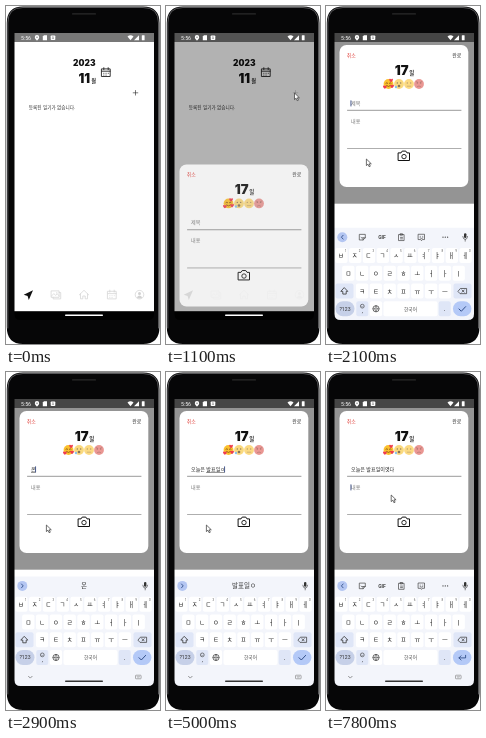
Write an HTML page that moves like this. It is 154x338 px and loops after 8000 ms.

```html
<!DOCTYPE html>
<html lang="ko">
<head>
<meta charset="utf-8">
<title>Diary app</title>
<style>
html, body { margin: 0; width: 100%; height: 100%; overflow: hidden; background: #fff; }
svg { display: block; width: 100%; height: 100%; }
text { font-family: "Noto Sans CJK KR", "Noto Sans CJK", "Noto Sans", sans-serif; white-space: pre; }
.num { font-family: Inter, sans-serif; font-weight: 900; }
.ui { font-family: Roboto, sans-serif; }
</style>
</head>
<body>
<svg id="stage" viewBox="0 0 154 338"></svg>
<script>
const LOOP = 8000;
const stage = document.getElementById('stage');

// Markup helpers
const text = (x, y, s, size, attrs = '') => `<text x="${x}" y="${y}" font-size="${size}" ${attrs}>${s}</text>`;
const mid = (x, y, s, size, attrs = '') => text(x, y, s, size, 'text-anchor="middle" ' + attrs);
const box = (x, y, w, h, r, fill, attrs = '') =>
  `<rect x="${x}" y="${y}" width="${w}" height="${h}" rx="${r}" fill="${fill}" ${attrs}/>`;
const dot = (x, y, r, fill, attrs = '') => `<circle cx="${x}" cy="${y}" r="${r}" fill="${fill}" ${attrs}/>`;
const line = (d, color, w, attrs = '') =>
  `<path d="${d}" fill="none" stroke="${color}" stroke-width="${w}" stroke-linecap="round" stroke-linejoin="round" ${attrs}/>`;
const fill = (d, color, attrs = '') => `<path d="${d}" fill="${color}" ${attrs}/>`;
const at = (x, y, body, attrs = '') => `<g transform="translate(${x} ${y})" ${attrs}>${body}</g>`;

function statusIcons() {
  return text(15, 33.6, '5:56', 5.2, 'class="ui" fill="#fff"') +
    fill('M31 29.1a2.2 2.2 0 0 1 2.2 2.2c0 1.5-2.2 3.4-2.2 3.4s-2.2-1.9-2.2-3.4a2.2 2.2 0 0 1 2.2-2.2z', '#fff') +
    dot(31, 31.3, .7, '#777') +
    fill('M38 29.3h3v5h-4.2v-3.8z', '#fff') +
    box(44.7, 29.5, 4.6, 4.6, .8, '#fff') + mid(47, 33.2, 'A', 3.6, 'class="ui" fill="#777"') +
    fill('M121.5 30.4q3-2.3 6 0l-3 3.8z', '#fff') +
    fill('M133 29.3v5h-5z', '#fff') +
    box(135.8, 29.3, 2.8, 5, .5, '#fff');
}

function calendar(x, y, color, w) {
  return at(x, y, line('M-4.2-3.4h8.4v7.6h-8.4zM-4.2-1.1h8.4M-2.2-4.6v2M2.2-4.6v2', color, w) +
    line('M-2.2 1h.1M0 1h.1M2.2 1h.1M-2.2 2.8h.1M0 2.8h.1', color, w));
}

function tabs() {
  const c = '#d2d2d2', w = .7, y = 288.7;
  return fill('M27 284.2l-9.3 4.5 3.9 1.3 1.2 3.9z', '#111') +
    at(50, y, line('M-4.5-3.8h7.6v6.4h-7.6zM3.1-2.2h1.6v6.4h-7.6v-1.6M-4.5 1.2l2.4-2.2 1.8 1.6 1.5-1.3 1.9 1.7', c, w) + dot(.8, -1.8, .6, c)) +
    at(78, y, line('M-4.7.2L0-4.4 4.7.2M-3.5-.8v4.9h2.3v-2.8h2.4v2.8h2.3v-4.9', c, w)) +
    calendar(106, y, c, w) +
    at(133.5, y, dot(0, 0, 4.3, 'none', `stroke="${c}" stroke-width="${w}"`) + dot(0, -1.2, 1.5, c) + fill('M-2.8 2.7q2.8-3.6 5.6 0Q0 5-2.8 2.7z', c));
}

function home() {
  return box(8, 27, 141, 290, 0, '#fff') + box(8, 27, 141, 9, 0, '#777') +
    mid(78.3, 59.6, '2023', 8.4, 'class="num" fill="#111"') +
    mid(78.3, 77.2, '11', 12.8, 'class="num" fill="#111"') +
    text(85.2, 77, '월', 5.2, 'font-weight="700" fill="#222"') +
    calendar(100, 66.3, '#222', .9) +
    line('M127.2 86.8h4.6M129.5 84.5v4.6', '#222', .6, 'id="plus"') +
    text(22.8, 103.3, '등록된 일기가 없습니다.', 4.65, 'fill="#333"') +
    tabs();
}

function face(x, color, opacity, parts) {
  return at(x, 132, dot(0, 0, 4.9, color) + parts, `opacity="${opacity}"`);
}

function moods() {
  const eyes = c => dot(-1.7, -1, .65, c) + dot(1.7, -1, .65, c);
  const heart = (x, y) => at(x, y, fill('M0 2.2C-3.4 0-1.3-2.2 0-.6 1.3-2.2 3.4 0 0 2.2z', '#ef3b4f'));
  return face(62.5, '#fbc02d', 1, line('M-2.6-.8q.9-1 1.8 0M.8-.8q.9-1 1.8 0M-1.9 1.6q1.9 1.9 3.8 0', '#6b3a10', .7) +
      heart(-3.6, 2.6) + heart(3.6, 1.8) + heart(2.6, -4)) +
    face(73, '#f7c948', .7, eyes('#5b3a10') + dot(0, 2, 1.3, '#5b3a10') + dot(-3, 3, 1.2, '#5aa9e6')) +
    face(83, '#fbc740', .65, eyes('#8a6420') + line('M-1.8 2.2h3.6', '#8a6420', .6)) +
    face(93, '#e0605a', .65, eyes('#7a2a20') + line('M-2.8-2.4l1.6.7M2.8-2.4l-1.6.7M-1.7 2.6q1.7-1.5 3.4 0', '#7a2a20', .6));
}

function dialog() {
  return box(13.5, 93, 128.8, 142, 7, '#fff') +
    text(20.8, 104.8, '취소', 4.9, 'fill="#e0443e"') +
    text(126.2, 104.8, '완료', 4.9, 'fill="#333"') +
    mid(75.6, 122.9, '17', 13.2, 'class="num" fill="#111"') +
    text(83.3, 122.5, '일', 5.4, 'font-weight="700" fill="#222"') +
    moods() +
    text(25, 153, '', 5.05, 'id="title"') + box(25, 154.1, 0, .5, 0, '#333', 'id="compose"') +
    line('M21.5 158.3H135', '#555', .6) +
    text(25, 171, '내용', 5.05, 'fill="#777"') +
    line('M21.5 196.5H135', '#777', .6) +
    box(24.5, 148.4, .9, 6, 0, '#34477f', 'id="caret"') +
    at(78, 204, line('M-5.5-3.1H-3l1.2-1.8h3.6L3-3.1h2.5v7.6h-11z', '#111', 1) + dot(0, .6, 2.2, 'none', 'stroke="#111" stroke-width=".9"'));
}

const KEY_H = 15, PITCH = 13.8;
const keyCap = (x, y, w, color = '#fff', r = 2) => box(x - w / 2, y - KEY_H / 2, w, KEY_H, r, color);

function keyRow(chars, x, y, digits) {
  return [...chars].map((c, i) => {
    const cx = x + i * PITCH;
    return keyCap(cx, y, 12.3) + mid(cx - (digits ? .5 : 0), y + 2.5, c, 6.3, 'fill="#222"') +
      (digits ? mid(cx + 4.3, y - 3.2, (i + 1) % 10, 3, 'class="ui" fill="#555"') : '');
  }).join('');
}

function toolbar() {
  const c = '#444', w = .7;
  return line('M.8-1.9L-.9 0 .8 1.9', '#23407c', .8) +
    at(20.2, 0, line('M-2.8-2.8h5.6v3.4L.6 2.8h-3.4zM2.8.6H.6v2.2M-1.5.3q.8 1 1.9.5', c, w)) +
    mid(39.7, 1.9, 'GIF', 5, `class="ui" font-weight="700" fill="${c}"`) +
    at(59.2, 0, line('M-2.6-2.6h5.2v6h-5.2zM-1-3.4h2v1.4h-2zM-1 .2h2M-1 1.7h2', c, w)) +
    at(79.2, 0, line('M-3-2.9h6v5.3H.8L0 3.5-.8 2.4H-3zM-1.3-.8h.1M1.2-.8h.1M-1.4.8q1.4 1.1 2.8 0', c, w)) +
    [-2.3, 0, 2.3].map(d => dot(103 + d, 0, .65, c)).join('');
}

function topStrip() {
  return at(16.3, 213.9, dot(0, 0, 5, '#b4c6f2') + `<g id="tools">${toolbar()}</g>` +
    '<g id="suggest">' + line('M-.8-1.9L.9 0l-1.7 1.9', '#23407c', .8) +
    mid(61.7, 2.1, '', 6.5, 'id="word" fill="#333"') + '</g>' +
    at(122.9, 0, box(-1.2, -4, 2.4, 4.8, 1.2, '#333') + line('M-2.4-.7q.3 2.9 2.4 2.9t2.4-2.9M0 2.3V4', '#333', .6)));
}

function keyboard() {
  const dark = '#333', tint = '#dfe6f7', blue = '#b4c9f7', y3 = 267.8, y4 = 285.5;
  return box(8, 204.5, 141, 130, 0, '#f3f5fb') + topStrip() +
    keyRow('ㅂㅈㄷㄱㅅㅛㅕㅑㅐㅔ', 15.4, 232.2, true) +
    keyRow('ㅁㄴㅇㄹㅎㅗㅓㅏㅣ', 22.3, 250, false) +
    keyRow('ㅋㅌㅊㅍㅠㅜㅡ', 36.1, y3, false) +
    keyCap(18.5, y3, 18, tint) + line(`M18.5 ${y3 - 3.2}l3.3 3.5h-1.6v2.7h-3.4v-2.7h-1.6z`, dark, .8) +
    keyCap(136.5, y3, 18, tint) + line(`M132.2 ${y3}l2.2-2.6h6.2v5.2h-6.2zM136 ${y3 - 1.1}l2.2 2.2M138.2 ${y3 - 1.1}l-2.2 2.2`, dark, .7) +
    keyCap(19, y4, 19, '#c6d0e8', 7.5) + mid(19, y4 + 1.9, '?123', 5.2, `class="ui" fill="${dark}"`) +
    keyCap(36.3, y4, 12, tint) + dot(36.3, y4 - 2.6, 1.9, 'none', `stroke="${dark}" stroke-width=".6"`) +
    line(`M35.5 ${y4 - 2.2}q.8 .8 1.6 0`, dark, .4) + mid(36.3, y4 + 4.2, ',', 6, `class="ui" fill="${dark}"`) +
    keyCap(50, y4, 12.3) + at(50, y4, dot(0, 0, 3.1, 'none', `stroke="${dark}" stroke-width=".7"`) +
      line('M-3 0h6M0-3q-2.8 3 0 6 2.8-3 0-6', dark, .5)) +
    keyCap(84.5, y4, 54) + mid(84.5, y4 + 1.8, '한국어', 4.8, 'fill="#555"') +
    keyCap(118.7, y4, 12, tint) + mid(118.7, y4 + 2, '.', 7, `class="ui" fill="${dark}"`) +
    keyCap(136.2, y4, 18.5, blue, 7.5) +
    line(`M133 ${y4 + .2}l2.3 2.3 4.3-4.6`, '#23407c', .9, 'id="done"') +
    line(`M139.6 ${y4 - 2.2}v2.6h-6.6M135 ${y4 - 1.7}l-2 2.1 2 2.1`, '#23407c', .8, 'id="enter"') +
    line('M22.5 304.3l1.8 1.8 1.8-1.8', '#666', .7) +
    box(129.5, 303.2, 5.6, 3.6, .6, 'none', 'stroke="#777" stroke-width=".6"') + line('M131 304.5h2.6M131.5 305.7h1.6', '#777', .4);
}

function phone() {
  const frame = 'M17 .5H137Q153.5 .5 153.5 17V321Q153.5 338 137 338H17Q.8 338 .8 321V17Q.8 .5 17 .5z';
  const hole = 'M8.5 27V308Q8.5 314 14.5 314H142Q148 314 148 308V27z';
  return fill(frame + hole, '#060607', 'fill-rule="evenodd"') +
    line('M1.8 322V17Q1.8 1.5 17 1.5H137Q152.5 1.5 152.5 17V322', '#58585a', 1) +
    box(66, 7.3, 24, 1.2, .6, '#2a2a2b');
}

stage.innerHTML =
  '<defs><clipPath id="screen"><rect x="8" y="27" width="141" height="288"/></clipPath></defs>' +
  '<g clip-path="url(#screen)">' + home() +
  box(8, 27, 141, 279, 0, '#000', 'id="dim"') + statusIcons() +
  box(8, 197.7, 141, 120, 0, '#fff', 'id="gap"') +
  `<g id="dialog">${dialog()}</g>` +
  box(8, 305.2, 141, 12, 0, '#000', 'id="nav"') +
  `<g id="keys">${keyboard()}</g>` +
  box(59, 308.4, 38, 1.5, .7, '#fff', 'id="handle"') + '</g>' + phone() +
  '<g id="cursor">' + fill('M0 0v6.6l1.6-1.4 1.1 2.5 1.2-.5-1.1-2.4h2.1z', '#fff', 'stroke="#333" stroke-width=".7" stroke-linejoin="round"') + '</g>';

const el = {};
stage.querySelectorAll('[id]').forEach(n => el[n.id] = n);
const set = (n, k, v) => el[n].setAttribute(k, v);
const show = (n, on) => set(n, 'display', on ? 'inline' : 'none');

// Typing: time, committed text, syllables being composed
const FIRST = '오늘은 ';
const typing = [
  ...['ㅇ', '오', '온', '오느', '오늘', '오늘ㅇ', '오늘으', '오늘은'].map((s, i) => [2700 + i * 100, '', s]),
  [3600, FIRST, ''], [3880, FIRST, 'ㅂ'], [4000, FIRST, '바'], [4100, FIRST, '발'],
  [4300, FIRST, '발ㅍ'], [4400, FIRST, '발표'], [4500, FIRST, '발푱'], [4600, FIRST, '발표이'],
  [4700, FIRST, '발표일'], [5000, FIRST, '발표일ㅇ'], [5600, FIRST, '발표일이'], [5700, FIRST, '발표일잉'],
  [5800, FIRST, '발표일이여'], [5900, FIRST, '발표일이엿'], [6200, FIRST, '발표일이엿ㄷ'], [6300, FIRST, '발표일이엿다']
];
const path = [[200, 146, 92], [600, 128.5, 87], [1200, 128.5, 87], [1600, 40.4, 153],
  [6950, 40.4, 153], [7100, 48, 147], [7250, 48, 147], [7500, 65.2, 123]];
const caretOff = [[2450, 2700], [6700, 7100], [7500, 7780]];

const clamp = v => Math.max(0, Math.min(1, v));
const width = s => [...s].reduce((w, c) => w + (c === ' ' ? .224 : .92), 0) * 5.05;

function cursorAt(t) {
  const i = path.findIndex(p => p[0] > t);
  if (i < 0) return path[path.length - 1].slice(1);
  if (i === 0) return path[0].slice(1);
  const [a, b] = [path[i - 1], path[i]], u = (t - a[0]) / (b[0] - a[0]);
  return [a[1] + (b[1] - a[1]) * u, a[2] + (b[2] - a[2]) * u];
}

function draw(t) {
  const opened = clamp((t - 900) / 265);
  const raised = t >= 1990;
  const moved = t >= 7780;
  const [, done, part] = typing.filter(k => k[0] <= t).pop() || [0, '', ''];
  const typed = done + part;

  set('plus', 'opacity', t >= 780 && t < 1150 ? .3 : 1);
  set('dim', 'opacity', .42 * Math.pow(opened, 1.2));
  show('dialog', opened > 0);
  set('dialog', 'opacity', Math.pow(opened, .65));
  set('dialog', 'transform', `translate(0 ${raised ? -54 : 271 * (1 - opened)})`);
  show('gap', raised);
  show('nav', !raised);
  show('handle', !raised || t >= 2200);
  set('handle', 'fill', raised ? '#333' : '#fff');

  show('keys', t >= 1900);
  set('keys', 'transform', `translate(0 ${110 * Math.pow(1 - clamp((t - 1900) / 300), 1.67)})`);
  const composing = t >= 2700 && !moved;
  show('tools', !composing);
  show('suggest', composing);
  el.word.textContent = part;
  show('done', !moved);
  show('enter', moved);

  el.title.textContent = typed || '제목';
  set('title', 'fill', typed ? '#222' : '#777');
  set('compose', 'x', 25 + width(done));
  set('compose', 'width', moved ? 0 : width(part));
  show('caret', t >= 1900 && !caretOff.some(([a, b]) => t >= a && t < b));
  set('caret', 'x', 24.5 + (moved ? 0 : width(typed)));
  set('caret', 'y', moved ? 166.4 : 148.4);

  show('cursor', t >= 200);
  set('cursor', 'transform', `translate(${cursorAt(t).join(' ')})`);
}

const start = performance.now();
function tick() {
  draw((performance.now() - start) % LOOP);
  requestAnimationFrame(tick);
}
draw(0);
requestAnimationFrame(tick);
</script>
</body>
</html>
```
